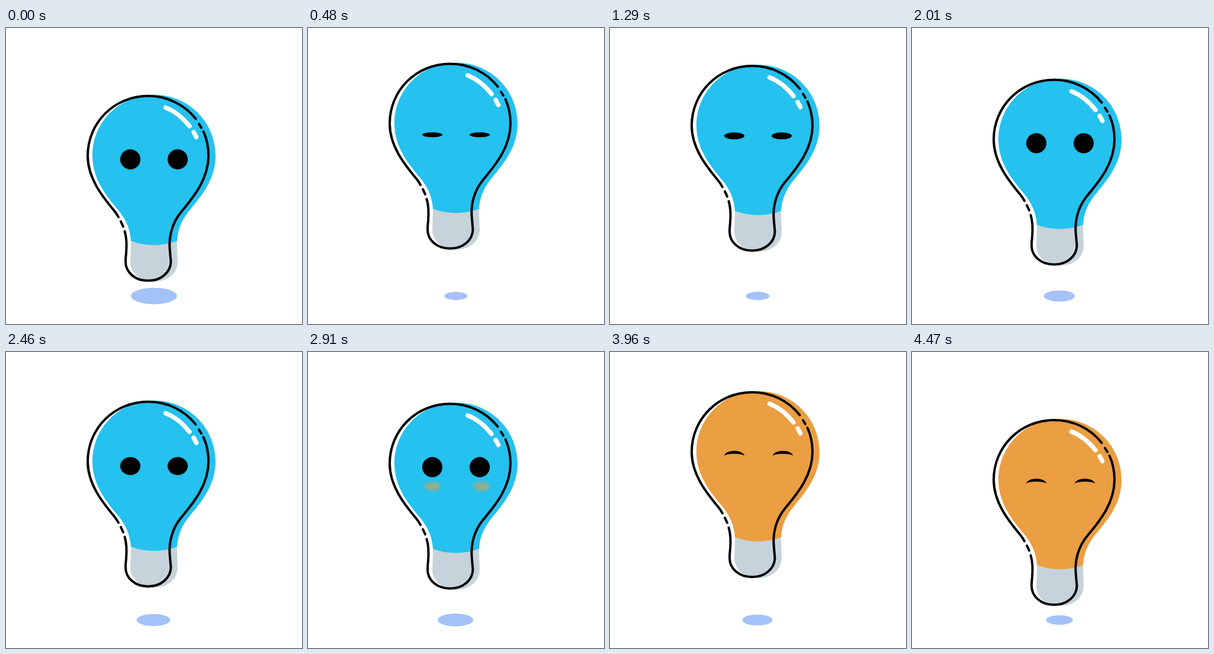
An HTML page that plays this animation: 500x500 px, repeating every 4.5 s.

```html
<!DOCTYPE html>
<html lang="en">
<head>
<meta charset="utf-8">
<title>Light bulb</title>
<style>
html, body { margin: 0; width: 100%; height: 100%; overflow: hidden; background: #fff; }
svg { display: block; width: 100%; height: 100%; }
</style>
</head>
<body>
<svg viewBox="0 0 500 500">
  <defs>
    <filter id="soft" x="-50%" y="-100%" width="200%" height="300%">
      <feGaussianBlur stdDeviation="2.6"/>
    </filter>
  </defs>
  <ellipse id="shadow" cy="452.7" fill="#a5c2f8"/>
  <g id="bulb">
    <path fill="#c6d3da" d="M211.5 355 L210 395 C210 415 228 429 250 429 C272 429 290 415 290 395 L288.5 355 Z"/>
    <path id="glass" d="M250 113 C308 113 354 159 354 216 C354 256 330 284 312 306 C298 322 290 340 289 360 Q250 374 211 360 C210 340 202 322 188 306 C170 284 146 256 146 216 C146 159 192 113 250 113 Z"/>
    <g id="blush" fill="#eb9e42" filter="url(#soft)">
      <ellipse cx="210" cy="254.5" rx="14" ry="7.5"/>
      <ellipse cx="293" cy="254.5" rx="14" ry="7.5"/>
    </g>
    <path id="eyeL"/>
    <path id="eyeR"/>
    <g fill="none" stroke-linecap="round">
      <path stroke="#fff" stroke-width="7.5" d="M269.5 134.5 C286 141 299 152 310 166 M317 176 L321.5 184.5"/>
      <g stroke="#000" stroke-width="4">
        <path d="M320.5 153.5 C301 129 272 115 240 115 C183 115 138 160 138 216 C138 254 163 285 183 309 Q187 314 190 319.5"/>
        <path d="M200.5 343.5 C204 355 204 368 203 380 Q202 388 202 395 C202 413 218 427 240 427 C262 427 278 413 278.5 395 Q277.5 384 276.5 372 C275 350 282 328 295 312 C313 290 342 258 342 216 C342 201 339 187 333.5 175"/>
        <path d="M194 327 L198 335.5 M326 162.3 L330 168.8"/>
      </g>
    </g>
  </g>
</svg>
<script>
const LOOP = 4500, HOP = 900, HALF = HOP / 2, LAST = 4470;
const HEIGHT = 58.6;
const BLUE = [37, 193, 239], ORANGE = [235, 158, 66];
// Shadow scale at each landing and peak in turn
const SCALE = [1, .47, .86, .46, .78, .55, .93, .59, .95, .58];

const $ = id => document.getElementById(id);
const set = (id, attrs) => {
  for (const name in attrs) $(id).setAttribute(name, attrs[name]);
};
const mix = (a, b, k) => a + (b - a) * k;
const ramp = (t, from, to) => Math.min(1, Math.max(0, (t - from) / (to - from)));

// Linear hop; the final landing comes just before the loop restarts
function lift(t) {
  const last = t > LOOP - HALF;
  const fall = last ? LAST - (LOOP - HALF) : HALF;
  const p = t % HOP;
  return HEIGHT * (p < HALF ? p / HALF : Math.max(0, 1 - (p - HALF) / fall));
}

function shadowScale(t) {
  const i = Math.floor(t / HALF);
  return mix(SCALE[i], SCALE[Math.min(i + 1, SCALE.length - 1)], t / HALF - i);
}

// Eyes close around each peak until the smile takes over
function openness(t) {
  if (t > 3 * HOP) return 1;
  return mix(.13, 1, ramp(Math.abs(t % HOP - HALF), 0, 240));
}

// Two half ellipses on a shared chord: a disc that flattens into a crescent
function eyePath(smile) {
  const chord = smile * .8;
  const top = mix(17, 8.8, smile), bottom = mix(-17, 3.8, smile);
  const steps = 64, points = [];
  for (let i = 0; i < steps; i++) {
    const a = i / steps * 2 * Math.PI, s = Math.sin(a);
    const y = chord - (s > 0 ? top * s : -bottom * s);
    points.push(`${(17 * Math.cos(a)).toFixed(2)} ${y.toFixed(2)}`);
  }
  return `M${points.join('L')}Z`;
}

function render(t) {
  const size = shadowScale(t);
  set('shadow', { cx: 250 - ramp(t, 0, 1800), rx: 39 * size, ry: 14 * size });
  set('bulb', { transform: `translate(0 ${-lift(t)})` });

  const warm = ramp(t, 3000, 3450);
  set('glass', { fill: `rgb(${BLUE.map((v, i) => Math.round(mix(v, ORANGE[i], warm)))})` });
  set('blush', { opacity: .55 * ramp(t, 2700, 2910) });

  const smile = ramp(t, 3000, 3300);
  const d = eyePath(smile);
  // The lids close onto the lower edge of the eye
  const place = x => `translate(${x} 239) scale(1 ${openness(t)}) translate(0 -17)`;
  set('eyeL', { d, transform: place(210) });
  set('eyeR', { d, transform: place(290 + 2 * smile) });
}

const start = performance.now();
function frame() {
  render((performance.now() - start) % LOOP);
  requestAnimationFrame(frame);
}
render(0);
requestAnimationFrame(frame);
</script>
</body>
</html>
```
